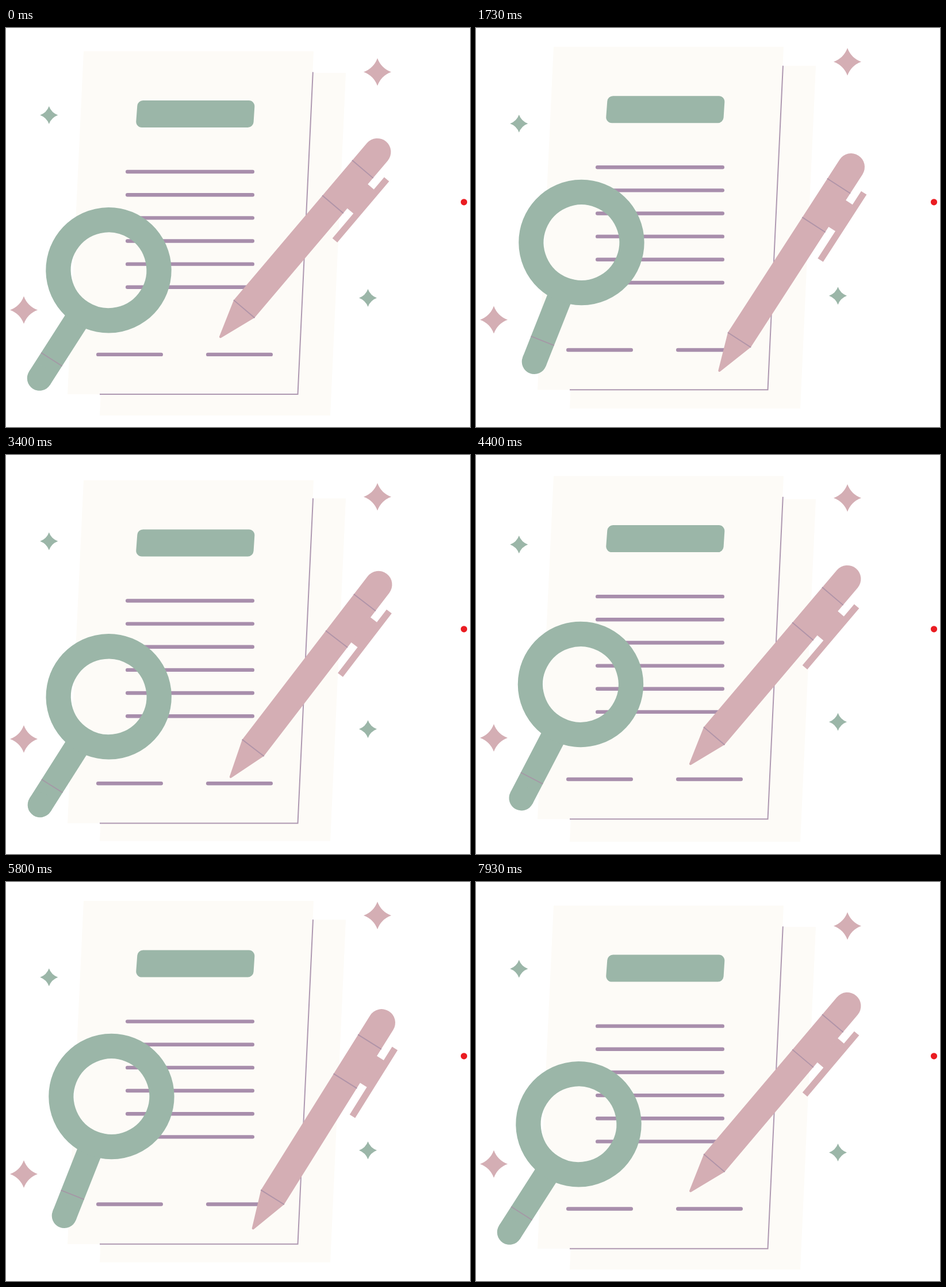
These frames come from a looping animation (807x694 px, 8.01 s). An HTML page with a canvas:

```html
<!DOCTYPE html>
<html lang="en">
<head>
<meta charset="utf-8">
<title>Document review</title>
<style>
html, body { margin: 0; width: 100%; height: 100%; overflow: hidden; background: #fff; }
canvas { display: block; width: 807px; height: 694px; }
</style>
</head>
<body>
<canvas id="stage" width="807" height="694"></canvas>
<script>
const ctx = document.getElementById('stage').getContext('2d');
const LOOP = 8010, CYCLE = 4, TAU = Math.PI * 2, RAD = Math.PI / 180;
const GREEN = '#9bb6a8', PINK = '#d4aeb4', MAUVE = '#a88eac', THIN = '#ae98b1', PAPER = '#fdfbf7';
const SWING = 11.05 * RAD, MOVE = 1.2;

// cosine float that peaks (lowest on screen) at the given second
const wave = (t, amp, peak) => amp * Math.cos(TAU * (t - peak) / CYCLE);

// cubic bezier easing (a, 0, b, 1)
function ease(x, a = 0.314, b = 0.285) {
  if (x <= 0) return 0;
  if (x >= 1) return 1;
  let lo = 0, hi = 1;
  for (let i = 0; i < 24; i++) {
    const s = (lo + hi) / 2, r = 1 - s;
    if (3 * a * s * r * r + 3 * b * s * s * r + s * s * s < x) lo = s; else hi = s;
  }
  return lo * lo * (3 - 2 * lo);
}

// 0 to 1 and back to 0 once per cycle
function outAndBack(t, out, back) {
  const s = t % CYCLE;
  return ease((s - out) / MOVE) - ease((s - back) / MOVE);
}

function polygon(points, color) {
  ctx.beginPath();
  points.forEach(([x, y]) => ctx.lineTo(x, y));
  ctx.closePath();
  ctx.fillStyle = color;
  ctx.fill();
}

function stroke(points, color, width, cap = 'butt') {
  ctx.beginPath();
  points.forEach(([x, y]) => ctx.lineTo(x, y));
  ctx.strokeStyle = color;
  ctx.lineWidth = width;
  ctx.lineCap = cap;
  ctx.stroke();
}

function rounded(points, r, color) {
  const n = points.length, [ax, ay] = points[n - 1], [bx, by] = points[0];
  ctx.beginPath();
  ctx.moveTo((ax + bx) / 2, (ay + by) / 2);
  points.forEach((p, i) => ctx.arcTo(...p, ...points[(i + 1) % n], r));
  ctx.closePath();
  ctx.fillStyle = color;
  ctx.fill();
}

function disc(x, y, r, color) {
  ctx.beginPath();
  ctx.arc(x, y, r, 0, TAU);
  ctx.fillStyle = color;
  ctx.fill();
}

function star(x, y, r, color) {
  const c = r * 0.27;
  ctx.beginPath();
  ctx.moveTo(x, y - r);
  ctx.quadraticCurveTo(x + c, y - c, x + r, y);
  ctx.quadraticCurveTo(x + c, y + c, x, y + r);
  ctx.quadraticCurveTo(x - c, y + c, x - r, y);
  ctx.quadraticCurveTo(x - c, y - c, x, y - r);
  ctx.fillStyle = color;
  ctx.fill();
}

function turnAbout(x, y, angle) {
  ctx.translate(x, y);
  ctx.rotate(angle);
  ctx.translate(-x, -y);
}

function papers(t) {
  const back = 71.6 + wave(t, 6.5, 0);
  polygon([[190, back], [591, back], [564, back + 596], [163, back + 596]], PAPER);

  const dy = wave(t, 6.4, 3.3);
  const top = 37.6 + dy, bottom = 634.2 + dy;
  polygon([[135, top], [535, top], [507, bottom], [107, bottom]], PAPER);

  const edgeTop = Math.min(back, 73.7 + dy);
  const edgeX = 535.5 - 28 * (edgeTop - top) / (bottom - top);
  stroke([[edgeX, edgeTop], [507.5, bottom], [163, bottom]], THIN, 2);

  rounded([[229, top + 85.5], [433, top + 85.5], [430, top + 132.5], [225.5, top + 132.5]], 10, GREEN);
  const bar = (x1, x2, y) => stroke([[x1 + 3.2, y], [x2 - 3.2, y]], MAUVE, 6.4, 'round');
  for (let i = 0; i < 6; i++) bar(208, 432, 247.15 + dy + i * 40.15);
  bar(157, 273, 565 + dy);
  bar(348, 464, 565 + dy);
}

function magnifier(t) {
  ctx.save();
  turnAbout(-69.5, 371.5, -11 * RAD * outAndBack(t, 0, 2.4));
  ctx.translate(178.5, 421.3);
  ctx.rotate(32.6 * RAD);
  stroke([[0, 100], [0, 223]], GREEN, 43.3);
  disc(0, 223, 21.65, GREEN);
  stroke([[-21.6, 184], [21.6, 184]], '#a597a6', 1.8);
  ctx.beginPath();
  ctx.arc(0, 0, 87.5, 0, TAU);
  ctx.strokeStyle = GREEN;
  ctx.lineWidth = 43.4;
  ctx.stroke();
  ctx.restore();
}

// local axes: x runs from the tip to the cap, y across the body
function pen(t) {
  ctx.save();
  turnAbout(850.7, 178, -SWING * outAndBack(t, 1.2, 2.8));
  ctx.translate(371.5, 539);
  ctx.rotate(-49.7 * RAD);
  ctx.beginPath();
  ctx.moveTo(66, -23.7);
  ctx.lineTo(424, -23.7);
  ctx.arc(424, 0, 23.7, -Math.PI / 2, Math.PI / 2);
  ctx.lineTo(66, 23.7);
  ctx.arcTo(-4, 0, 66, -23.7, 2);
  ctx.closePath();
  ctx.fillStyle = PINK;
  ctx.fill();
  ctx.fillRect(315.5, 23, 55, 16);
  ctx.fillRect(259, 37.6, 139.3, 11.2);
  for (const x of [66, 304.5, 384.7]) stroke([[x, -24], [x, 24]], '#b094a8', 1.9);
  ctx.restore();
}

function draw(t) {
  ctx.fillStyle = '#fff';
  ctx.fillRect(0, 0, 807, 694);
  papers(t);
  magnifier(t);
  pen(t);
  star(646, 67.2 + wave(t, 9.3, 0), 24, PINK);
  star(31, 499.4 + wave(t, 9, 2), 24, PINK);
  star(74.8, 158 + wave(t, 8.4, 1.57), 15.5, GREEN);
  star(629.5, 469.5 + wave(t, 9, 3), 15.5, GREEN);
  disc(796.5, 302.8, 5.6, '#ea1c22');
}

// two pictures per tenth of a second, at 0 and 1/30 s
function frame(now) {
  const ms = Math.min(now % LOOP, 7999);
  const tenth = Math.floor(ms / 100);
  draw(tenth / 10 + (ms - tenth * 100 >= 30 ? 1 / 30 : 0));
  requestAnimationFrame(frame);
}
draw(0);
requestAnimationFrame(frame);
</script>
</body>
</html>
```
